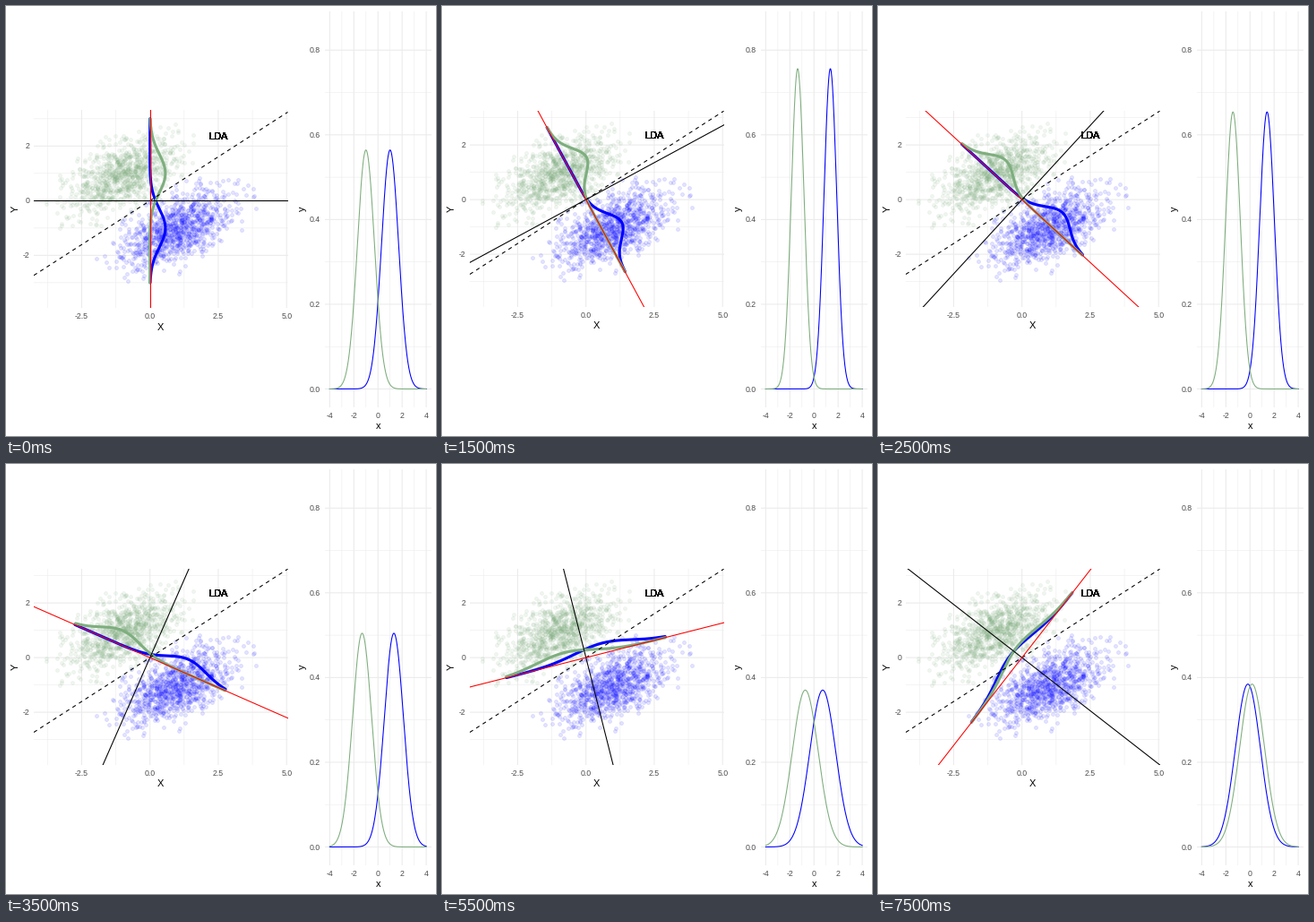
Animation of 480 by 480 pixels, one loop 8000 ms. Source, as a matplotlib script:

```python
import math

import numpy as np
import matplotlib.pyplot as plt
from matplotlib.animation import FuncAnimation

STAGE, DPI = 480, 80
PX = 72 / DPI                      # points per pixel
FRAMES, INTERVAL = 16, 500
STEP = np.pi / 19                  # rotation per frame
BLUE, GREEN, GRID, GREY = "#0000ff", "#7eae7e", "#ebebeb", "#4d4d4d"
THIN = 1.07

MEAN = np.array([1.0, -1.0])
COV = np.array([[1.0, 0.4], [0.4, 0.5]])
X_RANGE, Y_RANGE = (-3.83, 4.62), (-3.6, 2.92)

plt.rcParams["font.family"] = "Liberation Sans"
fig = plt.figure(figsize=(STAGE / DPI, STAGE / DPI), dpi=DPI, facecolor="white")


def expand(lo, hi):
    pad = 0.05 * (hi - lo)
    return lo - pad, hi + pad


def multiples(lo, hi, step, shift=0.0):
    first, last = math.ceil(lo / step - shift), math.floor(hi / step - shift)
    return [(k + shift) * step for k in range(first, last + 1)]


def place(ax, left, top, right, bottom):
    ax.set_position([left / STAGE, 1 - bottom / STAGE,
                     (right - left) / STAGE, (bottom - top) / STAGE])


def note(ax, text, xy, coords, dx, dy, size=11, color="black", ha="center", **kw):
    ax.annotate(text, xy, xycoords=coords, xytext=(dx * PX, dy * PX),
                textcoords="offset points", fontsize=size * PX, color=color,
                ha=ha, va="baseline", annotation_clip=False, **kw)


def panel(xlim, ylim, xstep, ystep, xfmt, yfmt, names, title_dx):
    ax = fig.add_axes([0, 0, 1, 1], facecolor="none")
    ax.set(xlim=xlim, ylim=ylim, xticks=[], yticks=[])
    ax.spines[:].set_visible(False)
    for shift, width in ((0.5, THIN / 2), (0, THIN)):
        style = dict(color=GRID, lw=width * PX, zorder=0, snap=False)
        for x in multiples(*xlim, xstep, shift):
            ax.axvline(x, **style)
        for y in multiples(*ylim, ystep, shift):
            ax.axhline(y, **style)
    for x in multiples(*xlim, xstep):
        note(ax, xfmt % x, (x, 0), ("data", "axes fraction"), 0, -12, 8.8, GREY)
    for y in multiples(*ylim, ystep):
        note(ax, yfmt % y, (0, y), ("axes fraction", "data"), -5, -3.1, 8.8, GREY, "right")
    note(ax, names[0], (0.5, 0), "axes fraction", 0, -24.6)
    note(ax, names[1], (0, 0.5), "axes fraction", title_dx, 0,
         rotation=90, rotation_mode="anchor")
    return ax


plane = panel(expand(*X_RANGE), expand(*Y_RANGE), 2.5, 2, "%.1f", "%d", "XY", -17.5)
chart = panel(expand(-4, 4), expand(0, 0.85), 2, 0.2, "%d", "%.1f", "xy", -22.5)
place(chart, 356, 5.5, 474.5, 447.6)

# Two classes of points with a shared covariance
rng = np.random.default_rng(7)
inverse = np.linalg.inv(COV)
for color, sign in ((GREEN, -1), (BLUE, 1)):
    off = rng.multivariate_normal((0, 0), COV, 1000)
    off = off[np.einsum("ni,ij,nj->n", off, inverse, off) < 9]
    x, y = (sign * MEAN + off).T
    keep = (x > X_RANGE[0]) & (y > Y_RANGE[0]) & (y < Y_RANGE[1])
    plane.scatter(x[keep], y[keep], s=(3.9 * PX) ** 2, color=color, alpha=0.1,
                  linewidths=0.94 * PX, zorder=1)


def line(ax, color, width, z, **kw):
    return ax.plot([], [], color=color, lw=width * PX, zorder=z, **kw)[0]


ridges = [line(plane, c, 3.1, 2, solid_capstyle="round") for c in (BLUE, GREEN)]
bells = [line(chart, c, THIN, 2) for c in (BLUE, GREEN)]
border = line(plane, "black", THIN, 3)
axis = line(plane, "red", THIN, 4)

# The best boundary, dashed from the panel's left edge
normal = inverse @ MEAN
edges = np.array(plane.get_xlim())
best = line(plane, "black", THIN, 3, ls=(0, (4, 4)), dash_capstyle="butt")
best.set_data(edges, -normal[0] / normal[1] * edges)
for _ in range(30):                # stacked copies give the heavy edges
    note(plane, "LDA", (2.5, 2.38), "data", 0, -4)

T_PLANE, T_CHART = np.linspace(-3, 3, 300), np.linspace(-4, 4, 300)
REACH = (-9, 9)


def density(t, mean, var):
    return np.exp(-(t - mean) ** 2 / (2 * var)) / np.sqrt(2 * np.pi * var)


def update(i):
    a = i * STEP
    u = np.array([np.sin(a), -np.cos(a)])
    n = np.array([np.cos(a), np.sin(a)])
    var, mean = u @ COV @ u, u @ MEAN
    top = Y_RANGE[1]
    for ridge, bell, m in zip(ridges, bells, (mean, -mean)):
        path = np.outer(u, T_PLANE) + np.outer(n, density(T_PLANE, m, var))
        ridge.set_data(*path)
        bell.set_data(T_CHART, density(T_CHART, m, var))
        top = max(top, path[1].max())
    axis.set_data(*np.outer(u, REACH))
    border.set_data(*np.outer(n, REACH))

    # Equal aspect: the panel height follows the y range
    ylim = expand(Y_RANGE[0], top)
    half = 283.5 / np.ptp(edges) * np.ptp(ylim) / 2
    plane.set_ylim(ylim)
    place(plane, 31, 226.5 - half, 314.5, 226.5 + half)
    return [*ridges, *bells, axis, border]


anim = FuncAnimation(fig, update, frames=FRAMES, interval=INTERVAL,
                     repeat=True, repeat_delay=0, blit=False)
plt.show()
```
